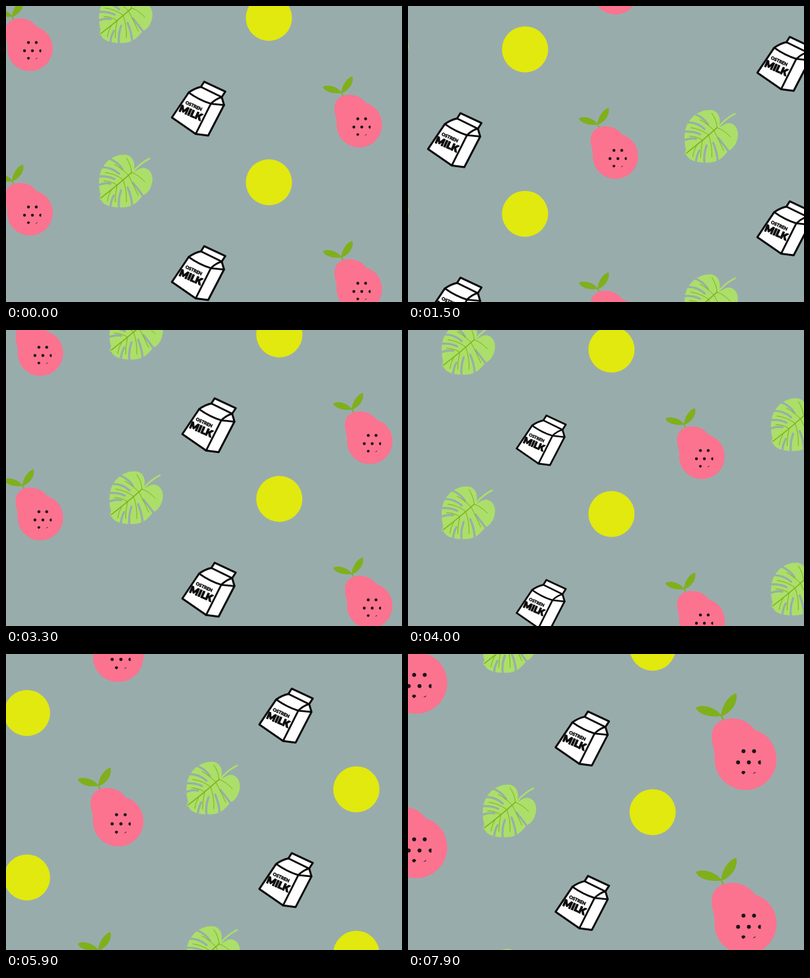
Write an HTML page with a canvas that moves like this. It is 600 px wide and 450 px high and loops after 8 s.

```html
<!DOCTYPE html>
<html lang="en">
<head>
<meta charset="utf-8">
<title>Fruit and milk pattern</title>
<style>
html, body { margin: 0; width: 100%; height: 100%; overflow: hidden; background: #99acac; }
canvas { display: block; width: 600px; height: 450px; }
</style>
</head>
<body>
<canvas id="stage" width="600" height="450"></canvas>
<script>
const ctx = document.getElementById('stage').getContext('2d');
const W = 600, H = 450, LOOP = 8000;
const BG = '#99acac', PINK = '#fb738f', LIME = '#abdf69', GREEN = '#7fb01c', INK = '#0b0b0b';
const UNIT = 499, ROW = 250, STAGGER = -116, SLOPE = 0.2168;

// Time in ms and horizontal drift; the pattern turns back near the end.
const drift = [[0, 181.5], [1500, -39.5], [2700, -211], [4000, -407.5],
  [5900, -684], [7200, -875], [7446, -911], [7900, -844.5], [8000, -829.8]];

function along(keys, t) {
  let i = 1;
  while (i < keys.length - 1 && t > keys[i][0]) i++;
  const [t0, a] = keys[i - 1], [t1, b] = keys[i];
  return a + (b - a) * (t - t0) / (t1 - t0);
}

function pulse(t, mid, half) {
  const d = Math.abs(t - mid) / half;
  return d < 1 ? (1 + Math.cos(Math.PI * d)) / 2 : 0;
}

function ease(t, from, to) {
  const k = Math.min(1, Math.max(0, (t - from) / (to - from)));
  return k * k * (3 - 2 * k);
}

function dot(x, y, r, fill) {
  ctx.fillStyle = fill;
  ctx.beginPath();
  ctx.arc(x, y, r, 0, Math.PI * 2);
  ctx.fill();
}

function shape(d, fill, stroke, width) {
  const p = new Path2D(d);
  if (fill) { ctx.fillStyle = fill; ctx.fill(p); }
  if (stroke) {
    ctx.strokeStyle = stroke;
    ctx.lineWidth = width;
    ctx.stroke(p);
  }
}

function leaf() {
  shape('M11 -13 C17 -27 10 -40 -2 -40 C-20 -40 -37 -27 -40 -5 C-41 6 -40 14 -38 20' +
    ' L-40 27 L-37 29 C-34 38 -18 41 -3 40 C15 39 21 27 26 22 C36 18 41 6 40.5 -5' +
    ' C39 -17 30 -22 22 -19 Z', LIME);
  // Gaps between the leaf fingers
  shape('M-25 -34 Q-12 -29 -5 -18 M-36 -21 Q-21 -21 -10 -11 M-41 -7 Q-27 -8 -17 -3' +
    'M-41 6 Q-31 2 -23 4 M-23 38 Q-22 29 -18 22 M-10 42 Q-12 28 -7 14' +
    'M10 39 Q9 24 3 10 M27 24 Q20 14 11 3', null, BG, 3.2);
  shape('M10 -13 Q22 -27 36 -34', null, LIME, 2.6);
  shape('M9 -13 Q8 -25 1 -35 M9 -13 Q20 -9 29 1 M4 -9 Q-7 -20 -17 -25' +
    'M-4 -2 Q-16 -11 -31 -13 M-13 6 Q-22 0 -33 0 M4 -9 Q12 6 19 22' +
    'M-4 -2 Q2 14 1 32 M-13 6 Q-16 20 -16 32 M-22 14 Q-27 23 -28 31', null, GREEN, 1);
  shape('M-38 26 Q-12 6 9 -13', null, GREEN, 1.6);
}

function label(text, x, y, size, weight) {
  ctx.save();
  ctx.translate(x, y);
  ctx.rotate(Math.PI * 0.135);
  ctx.font = '900 ' + size + 'px Lato, "Open Sans", sans-serif';
  ctx.textAlign = 'center';
  ctx.textBaseline = 'middle';
  ctx.fillStyle = ctx.strokeStyle = INK;
  ctx.lineWidth = weight;
  ctx.fillText(text, 0, 0);
  ctx.strokeText(text, 0, 0);
  ctx.restore();
}

function milk() {
  shape('M8.5 -41 L40.5 -26 L35 -17.5 L38.5 -5.5 L14.5 41 L-4.5 38.5 L-40.5 13.5' +
    ' L-15 -24.5 Q-6 -31 3.5 -33 Z', '#fff', INK, 3);
  shape('M3.5 -33 L35 -17.5 M-15 -24.5 Q1 -13 18.5 -7.5 L-4.5 38.5' +
    'M18.5 -7.5 L38.5 -5.5 M18.5 -7.5 Q26 -15 35 -17.5', null, INK, 2.8);
  label('OSTREN', -7.5, -3.8, 6.8, 0.4);
  label('MILK', -12.2, 7, 14.5, 1.3);
}

function pear() {
  shape('M-17 -30 L-14 -24', null, GREEN, 1.6);
  shape('M-45 -38 C-38 -43 -21 -38 -16.5 -29 C-25 -27 -41 -29 -45 -38 Z' +
    'M-16.5 -28.5 C-17 -40 -7 -53 0 -54 C3 -45 -5 -32 -16.5 -28.5 Z', GREEN);
  shape('M-27 -4 C-28 -18 -18 -26 -5 -26 C8 -26 16 -20 21 -13 C36 -9 45 5 45 19.5' +
    ' A34.5 34.5 0 0 1 -24 19.5 C-23 9 -27 5 -27 -4 Z', PINK);
  const seed = '#1c1418';
  for (const [x, y] of [[8.2, 10.5], [20, 10.5], [2.2, 23], [14.2, 23]]) dot(x, y, 2.2, seed);
  shape('M27.5 21 A2.2 2.2 0 1 0 27.5 25 Z M6 35 A2.2 2.2 0 0 1 10.4 34.5 L8.2 36.7 Z' +
    'M18.2 36 L21.7 33.5 L21.2 35 Z', seed);
}

function cat() {
  const fur = '#323232';
  shape('M-42 0 Q-42 -30 -37 -34 Q-28 -33 -17 -24 Z M42 0 Q42 -30 38 -35 Q28 -34 17 -24 Z', fur);
  shape('M0 -29 C27 -29 43 -15 43 5 C43 25 29 34 0 34 C-29 34 -43 25 -43 5 C-43 -15 -27 -29 0 -29 Z', fur);
  shape('M5 -33 Q9 -36 17 -30 Q25 -32 31 -26 Q29 -20 25 -18 Q20 -19 17 -23 Q10 -21 6 -25 Q9 -29 5 -33 Z', '#e6409f');
  for (const [x, y, r] of [[-18, 12, 4.3], [-23, 3, 2.7], [21, 12, 4.3], [24.5, 2, 2.7]]) {
    dot(x, y, r, '#9fcfcf');
    dot(x, y, r * 0.6, '#e6f7f7');
  }
  ctx.fillStyle = '#fa7b93';
  ctx.beginPath();
  ctx.ellipse(1, 10.5, 3.2, 2.3, 0, 0, Math.PI * 2);
  ctx.fill();
}

function ball() { dot(0, 0, 35, '#e1e90f'); }

function stamp(draw, x, y, scale) {
  if (x < -90 || x > W + 90) return;
  let top = ((y % ROW) + ROW) % ROW - ROW;
  for (; top < H + 90; top += ROW) {
    ctx.save();
    ctx.translate(x, top);
    ctx.scale(scale, scale);
    draw();
    ctx.restore();
  }
}

function render(t) {
  ctx.fillStyle = BG;
  ctx.fillRect(0, 0, W, H);
  ctx.lineJoin = ctx.lineCap = 'round';

  const x0 = along(drift, t);
  const y0 = 266 + (181.5 - x0) * SLOPE;
  const milkScale = 1 - 0.08 * pulse(t, 4000, 400);
  const pearScale = 1 + 0.11 * pulse(t, 5900, 400) + 0.36 * ease(t, 7400, 7900);
  const catTime = t >= 2200 && t < 3200;

  for (let n = -1; n < 5; n++) {
    const x = x0 + n * UNIT, y = y0 + (n & 1 ? STAGGER : 0);
    stamp(leaf, x, y, 1);
    stamp(milk, x + 110.5, y - 110, milkScale);
    if (catTime) stamp(cat, x + 218, y + 5, 1);
    else stamp(ball, x + 217, y + 2, 1);
    stamp(pear, x + 343.5, y - 105, pearScale);
  }
}

function tick(now) {
  render(now % LOOP);
  requestAnimationFrame(tick);
}
render(0);
requestAnimationFrame(tick);
</script>
</body>
</html>
```
